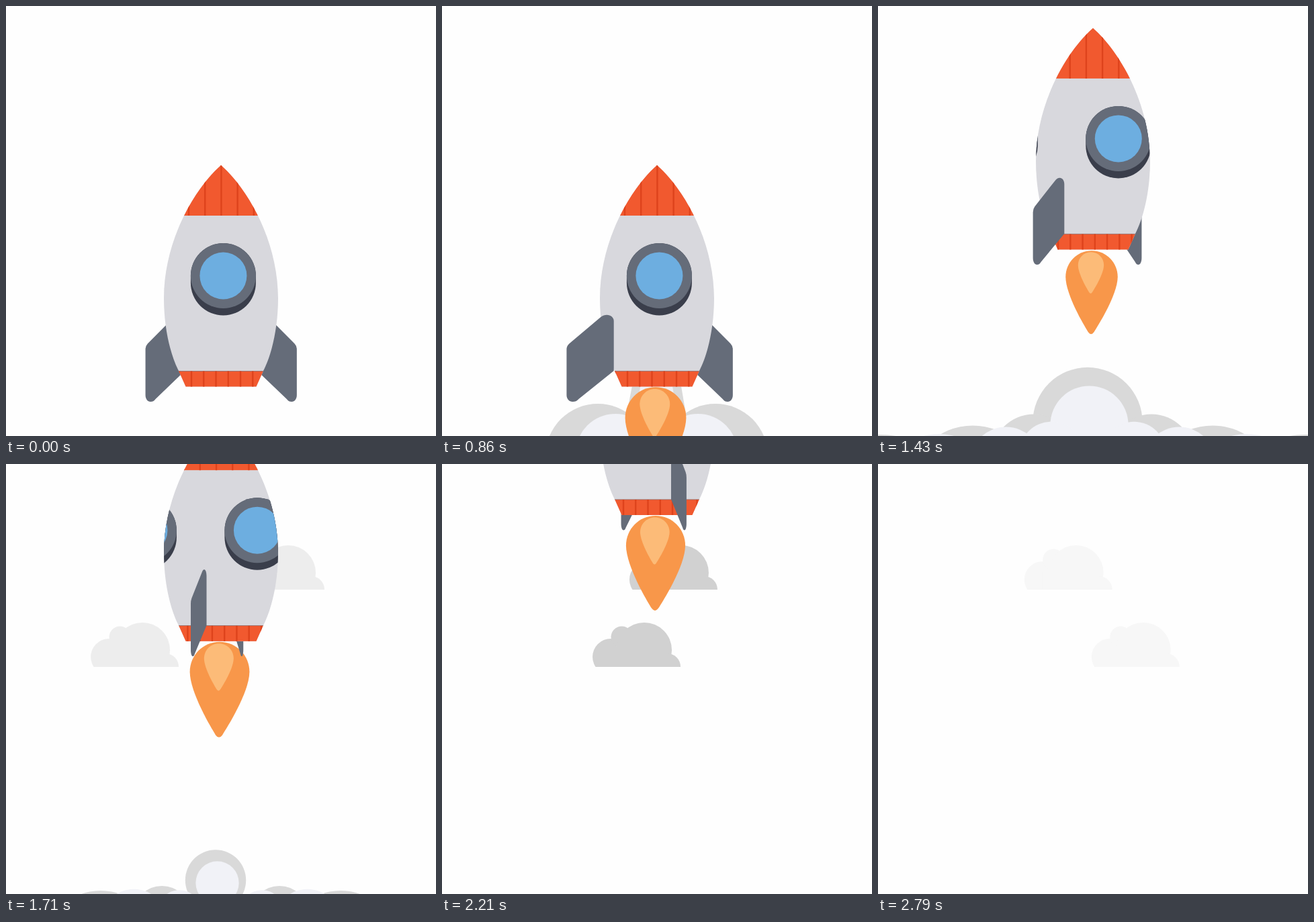
An HTML page for the animation above (3570 ms loop, 640x640 px).

```html
<!DOCTYPE html>
<html lang="en">
<head>
<meta charset="utf-8">
<title>Rocket launch</title>
<style>
html, body { margin: 0; width: 100%; height: 100%; overflow: hidden; background: #fefefe; }
svg { display: block; width: 100%; height: 100%; }
</style>
</head>
<body>
<svg viewBox="0 0 640 640">
  <defs>
    <clipPath id="hull">
      <path d="M320 237C360 272 405 350 405 435C405 480 395 520 383 543L372.5 566.5H267.5L257 543C245 520 235 480 235 435C235 350 280 272 320 237Z"/>
    </clipPath>
    <clipPath id="flat"><rect x="-5" y="-5" width="145" height="71"/></clipPath>
    <g id="cloudShape" clip-path="url(#flat)" fill="#d1d1d1">
      <circle cx="27" cy="51" r="27"/>
      <circle cx="43.5" cy="21.5" r="16"/>
      <circle cx="77" cy="41" r="41"/>
      <circle cx="111" cy="66" r="20"/>
      <rect x="27" y="40" width="84" height="26"/>
    </g>
    <g id="port">
      <rect x="-48.5" y="353" width="97" height="107.5" rx="48.5" fill="#3a3e4b"/>
      <circle cy="401.5" r="48.5" fill="#656c79"/>
      <circle cy="401.5" r="35" fill="#6daee0"/>
    </g>
    <path id="finShape" fill="#656c79" d="M135 511Q135 506 131 502.5L84 463C75 456.5 64.5 461 64.5 469V543L117 585C120 588 122 589 126 589C131 589 135 585 135 579Z"/>
    <path id="drop" d="M0 0C25 0 44.5 20 44.5 45C44 76 11 128 4 139Q-1 146 -6 139C-13 128 -44 76 -44.5 45C-44.5 20 -25 0 0 0Z"/>
  </defs>

  <use id="cloudA" href="#cloudShape"/>
  <use id="cloudB" href="#cloudShape"/>

  <g fill="#d9d9d9">
    <path id="plumeOut" d="M284 560L275 607Q245 612 228 637L210 645H430L411 636Q393 612 363 607L355 560Z"/>
    <g id="puffsOut"></g>
  </g>
  <g fill="#f1f2f7">
    <path id="plumeIn" d="M296 560L288 615Q257 623 238 642H401Q382 622 351 614L342 560Z"/>
    <g id="puffsIn"></g>
  </g>

  <g id="rocket">
    <g id="flame">
      <use href="#drop" fill="#f8974a"/>
      <use href="#drop" fill="#fcbb78" transform="translate(-1.2 2.5) scale(.495)"/>
    </g>
    <use id="rightFin" href="#finShape"/>
    <use id="leftBack" href="#finShape"/>
    <g clip-path="url(#hull)">
      <rect x="230" y="230" width="180" height="340" fill="#d8d8dd"/>
      <rect x="230" y="230" width="180" height="82" fill="#f1592f"/>
      <g id="ports">
        <use href="#port" x="323.4"/>
        <use href="#port" x="154.9"/>
      </g>
      <rect x="230" y="543.5" width="180" height="24" fill="#f1592f"/>
      <rect x="230" y="543" width="180" height=".8" fill="#8f6a68"/>
      <path id="noseLines" stroke="#de431c" stroke-width="2.4"/>
      <path id="bandLines" stroke="#de431c" stroke-width="2.4"/>
    </g>
    <use id="leftFront" href="#finShape"/>
  </g>
</svg>
<script>
const LOOP = 3570, STEP = 1000 / 14, LAST = 39;
const LIFTOFF = 857, SPREAD = 1214, MID = 320;
const $ = id => document.getElementById(id);
const set = (id, value) => $(id).setAttribute("transform", value);
const show = (id, on) => $(id).setAttribute("visibility", on ? "visible" : "hidden");
const clamp = v => Math.max(0, Math.min(1, v));
const cosDeg = a => Math.cos(a * Math.PI / 180);
const wave = (t, period) => Math.sin(2 * Math.PI * t / period);

// Smoke grows from "start", then loses the share "loss" of its size every 500 ms.
// Puffs are [offset from the axis, y, radius]; all but the first are mirrored.
const SMOKE = [
  { start: 760, loss: .585, out: [-7.5, 619.5, 109], in: [-5, 623.5, 77.5] },
  { start: 380, loss: .46, out: [87.5, 670, 78], in: [61.5, 666, 59] },
  { start: 700, loss: .18, out: [178.5, 719, 102.5], in: [129, 681, 59] },
  { start: 700, loss: .4, out: [315.5, 763, 151], in: [229, 724, 105] }
];

const puffs = [];
function addPuff(id, [dx, y, r], side, kind) {
  const el = document.createElementNS("http://www.w3.org/2000/svg", "circle");
  el.setAttribute("cx", 319.5 + side * dx);
  el.setAttribute("cy", y);
  $(id).appendChild(el);
  puffs.push({ el, r, kind });
}
SMOKE.forEach((kind, i) => {
  for (const side of i ? [-1, 1] : [1]) {
    addPuff("puffsOut", kind.out, side, kind);
    addPuff("puffsIn", kind.in, side, kind);
  }
});

function drawSmoke(t) {
  const age = Math.max(0, t - SPREAD) / 500;
  for (const { el, r, kind } of puffs) {
    const size = clamp((t - kind.start) / 450) * clamp(1 - kind.loss * age);
    el.setAttribute("r", r * size);
  }
  const grow = clamp((t - 285) / 215);
  const sink = 90 * clamp((t - LIFTOFF) / 250);
  for (const id of ["plumeOut", "plumeIn"]) {
    set(id, `translate(0 ${566 + sink}) scale(1 ${grow}) translate(0 -566)`);
    show(id, grow > 0 && sink < 90);
  }
}

function drawClouds(t) {
  const dt = t - 2214;
  const go = .181 * dt - 2.985e-5 * dt * dt;
  const alpha = clamp(Math.min((t - 1510) / 570, .15 + (2786 - t) / 585));
  set("cloudA", `translate(${279 - go * .654} 121)`);
  set("cloudB", `translate(${224 + go} 236)`);
  $("cloudA").setAttribute("opacity", alpha);
  $("cloudB").setAttribute("opacity", alpha);
}

// Height above the pad: a quick start, a slower stretch, then away.
function height(d) {
  if (d < 357) return .3641 * d;
  return 130 + .3454 * (d - 357) + .03 * Math.max(0, d - 857);
}

function lines(first, gap, turn, top, bottom) {
  let d = "";
  for (let i = -4; i < 9; i++) d += `M${first + (turn + i) * gap} ${top}V${bottom}`;
  return d;
}

function drawRocket(t) {
  const d = Math.max(0, t - LIFTOFF);
  const shake = t < 800 ? 2 * wave(t, 298) : 0;
  set("rocket", `translate(${shake} ${-height(d)})`);

  // The fins circle the hull; their width follows the cosine of the angle.
  const left = d ? 4.6 + .0769 * d : -33.6 + 38.2 * (t / LIFTOFF) ** 3;
  const right = 33.3 + 80 * (d / 1357) ** 1.38;
  const leftPose = `translate(${MID} 0) scale(${-cosDeg(left)} 1)`;
  set("leftBack", leftPose);
  set("leftFront", leftPose);
  show("leftBack", left < 0);
  show("leftFront", left >= 0);
  set("rightFin", `translate(${MID} 0) scale(${cosDeg(right)} 1)`);

  set("ports", `translate(${50.5 * (d / 857) ** .95} 0)`);
  const turn = .00135 * d - 6.3e-7 * d * d;
  $("noseLines").setAttribute("d", lines(272, 24.2, turn, 230, 312));
  $("bandLines").setAttribute("d", lines(276, 18.25, turn, 543.5, 568));

  const size = d ? .94 + .08 * wave(d + 55, 221) : Math.max(0, (t - 268) / 577);
  set("flame", `translate(318 ${573.5 - 6 * size}) scale(${size})`);
  show("flame", size > 0);
}

function draw(now) {
  const step = Math.min(LAST, Math.floor((now % LOOP + 5) / STEP));
  const t = step * STEP;
  drawClouds(t);
  drawSmoke(t);
  drawRocket(t);
}

const begin = performance.now();
function tick() {
  draw(performance.now() - begin);
  requestAnimationFrame(tick);
}
tick();
</script>
</body>
</html>
```
